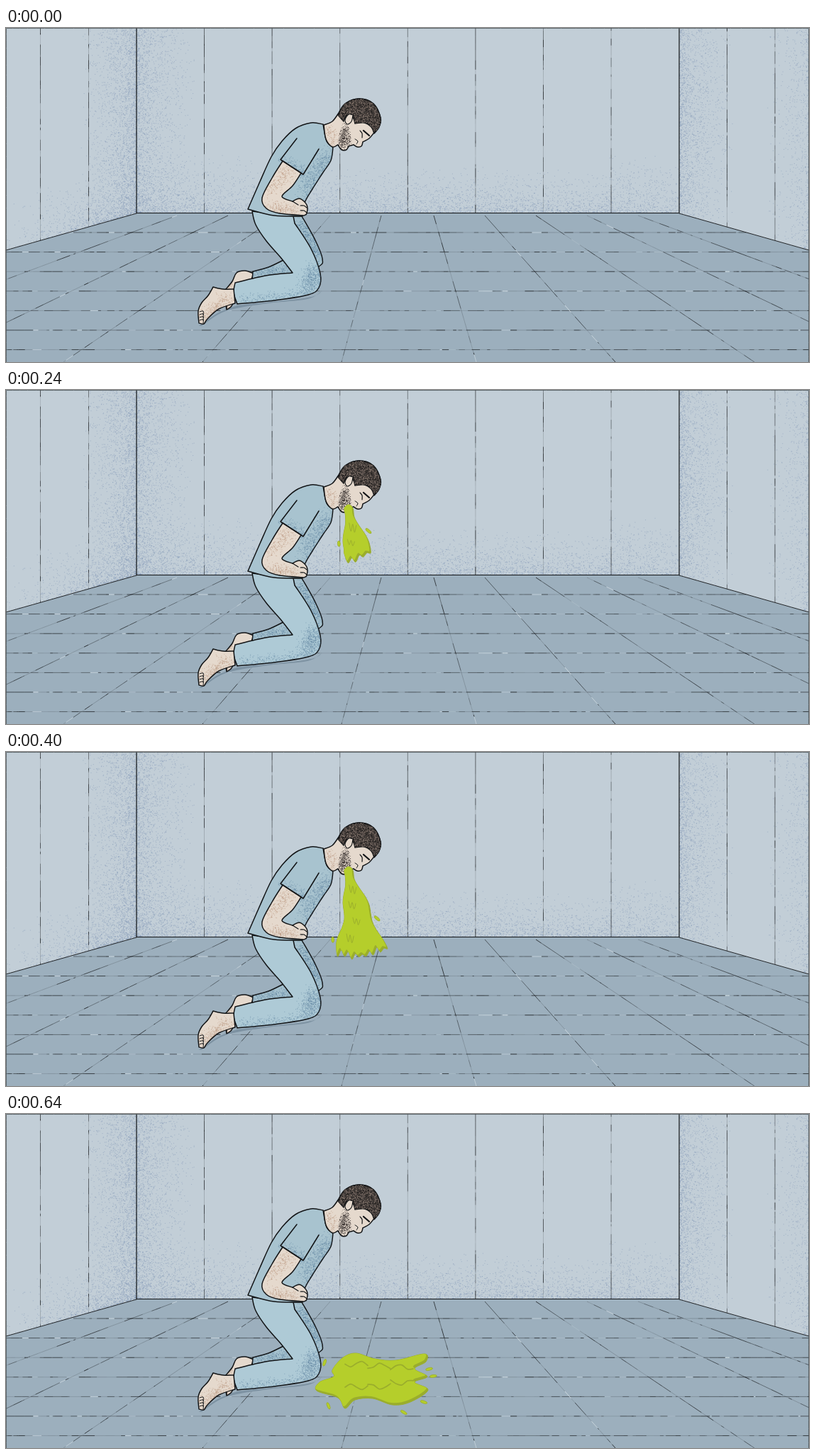
An HTML page with a canvas that plays this animation: 1132x472 px, repeating every 1000 ms.

```html
<!DOCTYPE html>
<html lang="en">
<head>
<meta charset="utf-8">
<title>Kneeling man</title>
<style>
html, body { margin: 0; width: 100%; height: 100%; overflow: hidden; background: #c2ced7; }
canvas { display: block; }
</style>
</head>
<body>
<canvas id="stage" width="1132" height="472"></canvas>
<script>
const W = 1132, H = 472, STEP = 80, LOOP = 1000;
const INK = '#121416', SKIN = '#e5d9cd', SHIRT = '#a8c3cf', PANTS = '#aecad6';
const SLIME = '#b5ce2b', RIM = '#9aad2c';
const DUST = 'rgba(112,136,174,.42)', SHADE = 'rgba(72,112,145,.38)', BLUSH = 'rgba(165,120,92,.35)';
const view = document.getElementById('stage').getContext('2d');
const scene = document.createElement('canvas');
scene.width = W;
scene.height = H;
let g = scene.getContext('2d');

let seed = 7;
function rnd() {
  seed = (seed * 16807) % 2147483647;
  return seed / 2147483647;
}
const spread = () => rnd() + rnd() + rnd() - 1.5;
const fade = reach => reach * rnd() * rnd();

// Smooth curve through points, added to a path that already stands on the first one
function spline(path, pts, loop) {
  const n = pts.length;
  const at = i => loop ? pts[(i + n) % n] : pts[Math.max(0, Math.min(n - 1, i))];
  for (let i = 0; i < (loop ? n : n - 1); i++) {
    const [a, b, c, d] = [at(i - 1), at(i), at(i + 1), at(i + 2)];
    path.bezierCurveTo(
      b[0] + (c[0] - a[0]) / 6, b[1] + (c[1] - a[1]) / 6,
      c[0] - (d[0] - b[0]) / 6, c[1] - (d[1] - b[1]) / 6, c[0], c[1]);
  }
}

const points = text => text.trim().split(/\s+/).map(p => p.split(',').map(Number));

function blob(pts) {
  const path = new Path2D();
  path.moveTo(...pts[0]);
  spline(path, pts, true);
  return path;
}

// "x,y x,y / x,y": curves that meet in a corner at each slash
function trace(text) {
  const path = new Path2D();
  let last;
  for (const part of text.split('/')) {
    const pts = points(part);
    if (last) pts.unshift(last);
    else path.moveTo(...pts[0]);
    spline(path, pts, false);
    last = pts[pts.length - 1];
  }
  return path;
}

function line(path, width = 1.5, ink = INK) {
  g.strokeStyle = ink;
  g.lineWidth = width;
  g.lineCap = g.lineJoin = 'round';
  g.stroke(typeof path === 'string' ? trace(path) : path);
}

function shape(text, fill, width) {
  const path = trace(text);
  path.closePath();
  g.fillStyle = fill;
  g.fill(path);
  if (width !== 0) line(path, width);
  return path;
}

function dots(n, color, at, clip, size = 1) {
  g.save();
  if (clip) g.clip(clip);
  g.fillStyle = color;
  for (let i = 0; i < n; i++) g.fillRect(...at(), size, size);
  g.restore();
}

// Points scattered around the segment a-b
const along = (ax, ay, bx, by, r) => () => {
  const t = rnd();
  return [ax + (bx - ax) * t + spread() * r, ay + (by - ay) * t + spread() * r];
};

// Straight line with uneven ink; gaps and pale are shares from 0 to 1
function rough(x1, y1, x2, y2, gaps, pale) {
  const len = Math.hypot(x2 - x1, y2 - y1);
  const dx = (x2 - x1) / len, dy = (y2 - y1) / len;
  for (let s = 0; s < len;) {
    const e = Math.min(len, s + 2 + rnd() * 12);
    g.strokeStyle = rnd() < pale ? '#dfe7eb' : INK;
    g.globalAlpha = rnd() < gaps ? 0.22 : 0.55 + rnd() * 0.4;
    g.lineWidth = 0.6 + rnd() * 0.3;
    g.beginPath();
    g.moveTo(x1 + dx * s, y1 + dy * s);
    g.lineTo(x1 + dx * e, y1 + dy * e);
    g.stroke();
    s = e;
  }
  g.globalAlpha = 1;
}

function room() {
  const floorY = x => 262 + Math.max(0, 184 - x, x - 949) * 0.283;
  g.fillStyle = '#c2ced7';
  g.fillRect(0, 0, W, H);
  // Dust settles in the corners and along the floor
  const corner = (n, x0, reach) => dots(n, DUST, () => {
    const x = x0 + fade(reach);
    return [x, rnd() * floorY(x)];
  });
  corner(2600, 184, -80);
  corner(1900, 184, 85);
  corner(1900, 949, 75);
  corner(700, 1131, -60);
  dots(4600, DUST, () => {
    const x = 184 + 765 * rnd();
    return [x, 261 - fade(x < 350 || x > 850 ? 85 : 65)];
  });
  dots(900, DUST, () => {
    const x = 184 * Math.sqrt(rnd());
    return [x, floorY(x) - fade(75)];
  });

  const floor = trace('0,314 / 184,262 / 949,262 / 1132,314 / 1132,472 / 0,472');
  g.fillStyle = '#9cafbd';
  g.fill(floor);
  for (let i = 0; i < 7; i++) {
    const x = 279.5 + i * 95.6;
    rough(x, 0, x, 261, 0.3, 0);
  }
  for (const x of [48.5, 116.5, 1016.5, 1084]) rough(x, 0, x, floorY(x), 0.25, 0);

  g.save();
  g.clip(floor);
  for (let i = 0; i < 7; i++) {
    const y = 289 + i * 27.6;
    rough(0, y, W, y, 0.35, 0.06);
  }
  for (let k = 0; k < 5; k++) {
    for (const side of [-1, 1]) {
      rough(566 + side * (37 + 72 * k), 265, 568 + side * (95 + 196 * k), H, 0.35, 0.04);
    }
  }
  g.restore();
  line('184,0 / 184,261.5 / 949,261.5 / 949,0', 1.2);
  line('0,314 / 184,262', 0.9);
  line('949,262 / 1132,314', 0.9);
  line('0.5,472 / 0.5,0.5 / 1131.5,0.5 / 1131.5,472', 0.8, '#4b5357');
}

function legs() {
  shape('272,421 300,402 326,392 / 425,381 446,371 / 425,383 370,389 310,400 276,421', '#7d92a2', 0);

  const farFoot = shape('349,347 337,343 325,346 319,358 310,369 / 309,384 311,398 / 317,394 323,384 / 345,358', SKIN);
  dots(200, BLUSH, along(320, 366, 312, 390, 9), farFoot);
  line('311,397 312,391 316,389', 1);

  const farLeg = shape('391,328 370,338 348,344 / 347,357 / 407,352 / 441,337 446,326 436,300 417,266 / 400,266', '#a4c0cd');
  dots(650, SHADE, along(413, 275, 440, 325, 12), farLeg);
  dots(350, SHADE, along(350, 349, 400, 338, 10), farLeg);

  const nearLeg = shape('347,259 352,278 367,301 387,324 404,346 / 366,350 323,360 / 321,374 326,390 / 378,385 426,377 441,367 443,347 430,312 407,276 / 405,266', PANTS);
  dots(650, SHADE, along(438, 340, 426, 370, 17), nearLeg);
  dots(350, SHADE, along(330, 386, 430, 376, 10), nearLeg);

  const foot = shape('321,369 306,369 292,366 / 285,378 276,388 271,400 272,417 / 279,418 284,411 300,397 323,389', SKIN);
  dots(350, BLUSH, along(314, 382, 278, 408, 11), foot);
  for (let y = 401; y < 416; y += 4) line(`273,${y} 278,${y - 1} 278,${y + 4}`, 1);
}

function torso() {
  const shirt = shape('447,136 430,134 408,142 389,160 374,182 358,217 341,256 / 378,265 418,266 / 421,247 431,229 447,204 458,187 461,168 / 452,160 447,136', SHIRT);
  dots(750, SHADE, along(456, 175, 421, 238, 15), shirt);
  dots(250, SHADE, along(390, 188, 418, 205, 10), shirt);
  line('410,156 / 387,186 / 419,207 / 441,171');

  const arm = shape('390,188 375,212 361,240 367,255 386,262 420,265 / 424,262 424,250 414,241 404,245 / 389,238 404,223 416,205', SKIN, 0);
  dots(260, BLUSH, along(402, 199, 371, 230, 12), arm);
  dots(260, BLUSH, along(370, 250, 412, 262, 9), arm);
  line(arm);
  line('404,245 / 412,250', 1.2);
  for (const y of [251, 258]) line(`415,${y} 420,${y} 424,${y + 3}`, 1.2);
}

function head() {
  const face = shape('448,137 460,132 469,120 / 478,107 498,100 518,107 528,127 525,141 518,149 / 512,156 503,161 / 501,167 495,168 490,165 / 483,167 / 480,172 473,172 468,165 / 460,168 451,157 448,137', SKIN);
  dots(130, BLUSH, along(454, 141, 463, 163, 9), face);
  const beard = trace('476,131 486,145 487,158 491,165 / 478,173 469,167 470,150 476,131');
  dots(480, 'rgba(30,24,24,.65)', along(477, 139, 475, 168, 10), beard, 0.9);

  const hair = shape('468,123 478,107 498,100 518,107 528,127 526,140 519,149 / 515,140 505,134 492,135 / 490,128 485,122 479,125 476,132 / 468,123', '#47403d');
  const scatter = () => [465 + rnd() * 65, 98 + rnd() * 54];
  dots(1100, 'rgba(161,143,132,.8)', scatter, hair);
  dots(800, '#151414', scatter, hair);

  shape('489,123 483,122 478,130 481,136 487,132 489,123', SKIN, 1.1);
  line('504,145 512,152', 2.2);
  line('499,145 502,149 502,155', 1.2);
  line('492,157 496,160 494,164', 1);
}

// Edges of the falling stream at height y
const ease = t => { t = Math.max(0, Math.min(1, t)); return t * t * (3 - 2 * t); };
const leftX = y => 477 - 10 * ease((y - 220) / 60) + 2 * Math.sin(y / 9);
const rightX = y => 489 + (y - 168) * 0.42 + 3 * Math.sin((y - 196) / 10);
const tipY = n => 204 + 3.25 * n + 2.6 * n * n;

function stream(end) {
  const pts = [[477, 167], [483, 162], [489, 167]];
  for (let y = 180; y < end - 12; y += 12) pts.push([rightX(y), y]);
  const l = leftX(end), r = rightX(end - 8);
  const lobes = Math.round((r - l) / 5);
  for (let i = 0; i <= lobes; i++) {
    const t = i / lobes;
    const y = end - 9 * (1 - t) + 7 * Math.sin(t * Math.PI) + (i % 2 ? -4 : 3) + spread() * 3;
    pts.push([r + (l - r) * t, y]);
  }
  for (let y = end - 12; y > 175; y -= 12) pts.push([leftX(y), y]);
  return blob(pts);
}

const puddle = blob(points(`474,345 493,338 520,346 550,348 590,339 592,350 576,360 594,371
  576,379 595,390 570,407 545,411 517,402 492,404 478,416 468,401 438,391 442,379 462,371 460,362`));

function fillSlime(path) {
  line(path, 1, RIM);
  g.fillStyle = RIM;
  g.fill(path);
  g.save();
  g.clip(path);
  g.translate(-2, -3);
  g.fillStyle = SLIME;
  g.fill(path);
  g.restore();
}

function drop(x, y, r, turn) {
  const path = new Path2D();
  path.ellipse(x, y, r, 1.9, turn, 0, 7);
  g.fillStyle = SLIME;
  g.fill(path);
  line(path, 0.8, RIM);
}

// Zigzag of small runs
function drip(x, y, runs, h) {
  const pts = [];
  for (let i = 0; i <= runs * 2; i++) pts.push(`${x + i * 2.5},${y + (i % 2 ? h : 0) + i * 0.8}`);
  line(pts.join(' '), 1, RIM);
}

function pour(n, landed) {
  const end = tipY(n);
  const body = stream(end);
  if (landed) body.addPath(puddle);
  fillSlime(body);
  for (let y = 188; y < end - 12; y += 23) {
    const x = leftX(y) + 5 + rnd() * Math.max(0, rightX(y) - leftX(y) - 24);
    drip(x, y, 1 + Math.round(rnd() * 1.4), 6 + rnd() * 5);
  }
  if (landed) for (let x = 476; x < 560; x += 36) drip(x, 362 + rnd() * 22, 2, 6);
  const y = end - 20 - 6 * n;
  drop(leftX(end - 20) - 6, end - 20, 4, 1.5);
  drop(rightX(y) + 8, y, 5, 0.7);
}

function splat() {
  fillSlime(puddle);
  for (let i = 0; i < 6; i++) {
    const x = 478 + (i % 3) * 32, y = 358 + (i > 2 ? 24 : 0) + spread() * 5;
    const pts = [];
    for (let k = 0; k < 5; k++) pts.push(`${x + k * 8},${y + 4 * Math.sin(k * 1.7 + i)}`);
    line(pts.join(' '), 1.7, RIM);
  }
  for (const a of [-2.5, -0.42, -0.2, 1.05, 0.6, 2.4]) {
    drop(518 + 86 * Math.cos(a), 380 + 48 * Math.sin(a), 5, a / 2);
  }
}

room();
legs();
torso();
head();
g = view;

function frame() {
  const n = Math.floor(performance.now() % LOOP / STEP);
  seed = 40 + n;
  g.drawImage(scene, 0, 0);
  if (n > 7) {
    seed = 48;
    splat();
  } else if (n > 0) {
    pour(n, n === 7);
  }
  requestAnimationFrame(frame);
}
frame();
</script>
</body>
</html>
```
